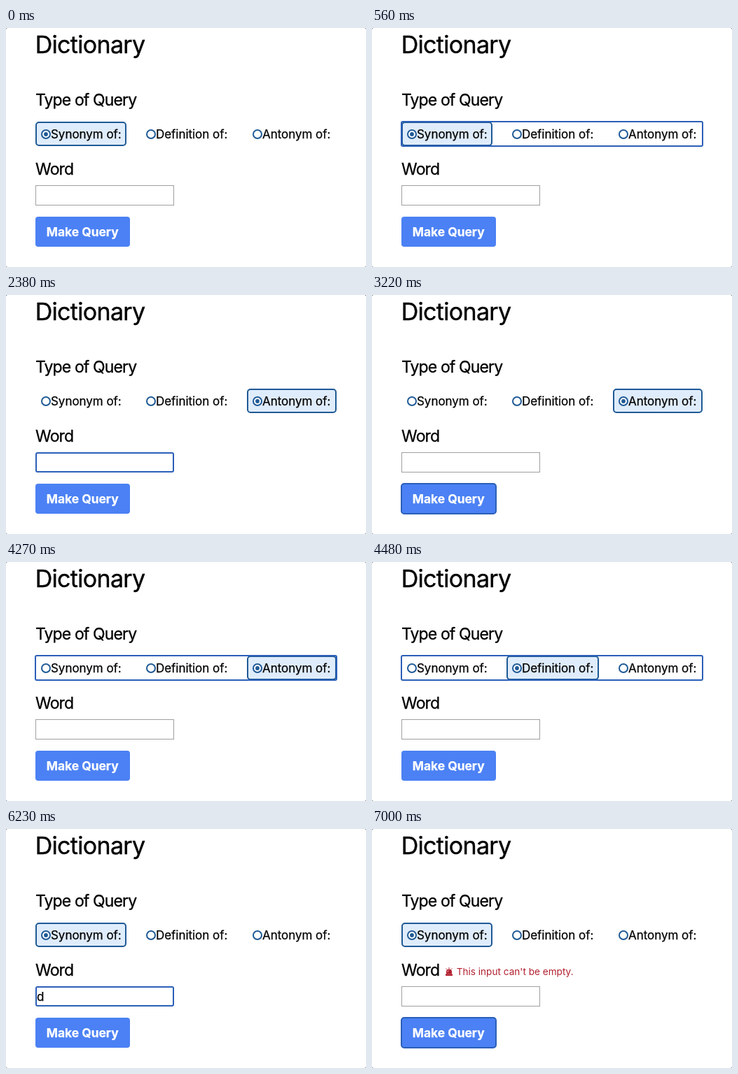
Animation, 514 px wide and 342 px high, one loop 8470 ms. Source, as an HTML page:

```html
<!DOCTYPE html>
<html lang="en">
<head>
<meta charset="utf-8">
<title>Dictionary</title>
<style>
  html, body { margin: 0; width: 100%; height: 100%; overflow: hidden; background: #777; }
  svg { display: block; width: 514px; height: 342px; }
  text { font-family: Inter, Roboto, sans-serif; font-optical-sizing: none; white-space: pre; stroke: #000; stroke-width: .25px; }
  .title { font-size: 34px; letter-spacing: -.68px; stroke-width: .4px; }
  .head { font-size: 23px; letter-spacing: -.87px; stroke-width: .3px; }
  .label { font-size: 17px; letter-spacing: -.04px; }
  .button { font-size: 17.4px; font-weight: 700; fill: #fff; stroke: #fff; }
  .error { font-size: 13.6px; fill: #b2202f; stroke: none; }
  .box { fill: #dfecfb; stroke: #1f5a96; stroke-width: 2; }
  .radio { fill: #fff; stroke: #1f5a96; stroke-width: 2; }
  .dot { fill: #1f5a96; }
  .ring { fill: none; stroke: #2b5fb8; stroke-width: 2; }
</style>
</head>
<body>
<svg viewBox="0 0 514 342">
  <rect width="514" height="342" rx="2.5" fill="#fff"/>
  <text class="title" x="41.700" y="36">Dictionary</text>
  <text class="head" x="42" y="111">Type of Query</text>
  <g id="options"></g>
  <rect id="group" class="ring" x="42" y="134" width="430" height="35" rx="2"/>

  <text class="head" x="42" y="210">Word</text>
  <g id="error">
    <g fill="#b2202f">
      <path d="M106 207.500v-3a4 4 0 0 1 8 0v3z"/>
      <rect x="105" y="207.500" width="10" height="2.500" rx=".5"/>
      <path d="M110 198v2M105.500 199.500l1.300 1.300M114.500 199.500l-1.300 1.300" stroke="#b2202f"/>
      <path d="M108 205v-.5a2 2 0 0 1 1.500-2" fill="none" stroke="#fff" stroke-width=".7"/>
    </g>
    <text class="error" x="120.700" y="209">This input can't be empty.</text>
  </g>

  <rect id="plain" x="42.500" y="225.500" width="197" height="28" fill="#fff" stroke="#a0a0a0"/>
  <rect id="input" class="ring" x="43" y="226" width="196" height="27" rx="2"/>
  <text id="typed" class="label" x="44" y="246">d</text>
  <rect id="caret" x="53" y="229" width="1" height="21"/>

  <rect x="42" y="270" width="135" height="43" rx="4" fill="#4b81f4"/>
  <rect id="button" class="ring" x="42" y="270" width="135" height="43" rx="4"/>
  <text class="button" x="57.700" y="298">Make Query</text>
</svg>
<script>
const LOOP = 8470;
const $ = id => document.getElementById(id);
const show = (el, on) => { el.style.visibility = on ? 'visible' : 'hidden'; };

// [left, width, label]
const options = [[42, 130, 'Synonym'], [192, 132, 'Definition'], [344, 128, 'Antonym']];
$('options').innerHTML = options.map(([x, w, label]) => `
  <rect class="box" x="${x + 1}" y="135" width="${w - 2}" height="33" rx="4"/>
  <circle class="radio" cx="${x + 15}" cy="152" r="6"/>
  <circle class="dot" cx="${x + 15}" cy="152" r="2.9"/>
  <text class="label" x="${x + 22}" y="158">${label} of:</text>`).join('');
const boxes = document.querySelectorAll('.box');
const dots = document.querySelectorAll('.dot');

// [start time, value]
const selection = [[0, 0], [1330, 1], [1750, 2], [4340, 1], [4550, 0]];
const focus = [[0, ''], [560, 'group'], [2380, 'input'], [3150, 'button'], [3710, 'input'],
  [3990, 'group'], [4900, 'input'], [6930, 'button']];

const valueAt = (steps, t) => steps.filter(([start]) => start <= t).pop()[1];

function draw(t) {
  const selected = valueAt(selection, t);
  const focused = valueAt(focus, t);
  options.forEach((_, i) => {
    show(boxes[i], i === selected);
    show(dots[i], i === selected);
  });
  for (const id of ['group', 'input', 'button']) show($(id), id === focused);
  show($('plain'), focused !== 'input');
  show($('typed'), t >= 5740 && t < 6650);
  show($('caret'), t >= 5740 && t < 6230);
  show($('error'), t >= 6930);
}

const begin = performance.now();
function frame() {
  draw((performance.now() - begin) % LOOP);
  requestAnimationFrame(frame);
}
frame();
</script>
</body>
</html>
```
